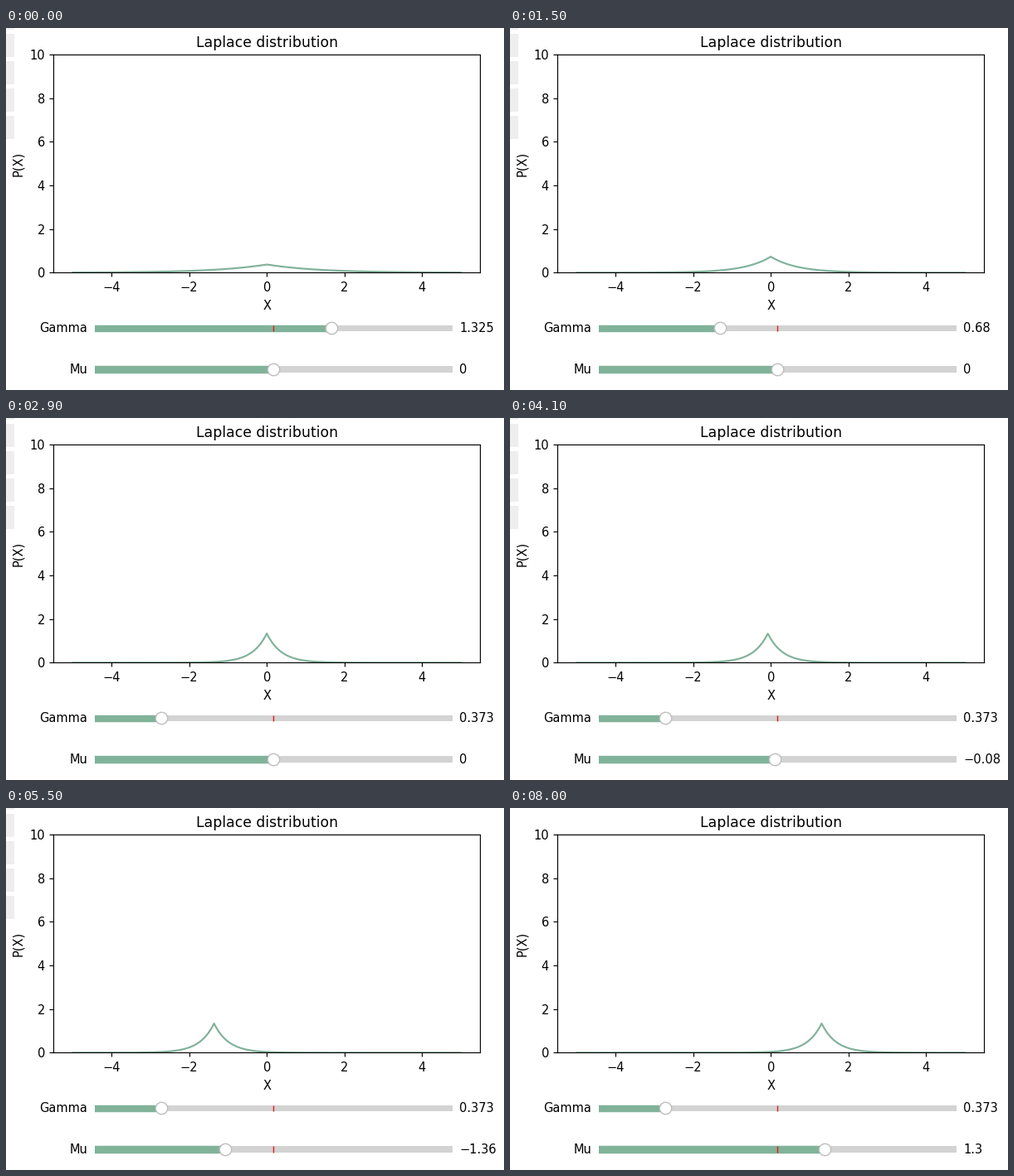
Animation of 600 by 437 pixels, one loop 9400 ms. Source, as a matplotlib script:

```python
import numpy as np
import matplotlib.pyplot as plt
from matplotlib.animation import FuncAnimation
from matplotlib.patches import Rectangle

W, H, DPI = 600, 437, 103.8
FRAMES, STEP = 94, 100
GREEN = "#81B29A"
TURN = -1.753  # leftmost mu, where the drag reverses

# ticks at which the dragged knob rests for one step
STALLS = {4, 44, 48, *range(6, 25, 6), *range(46, 63, 4)}

plt.rcParams.update({"font.family": "DejaVu Sans", "font.size": 10.2,
                     "axes.titlesize": 12})


def drag(tick, t0, t1, a, b, power):
    """Ease from a at t0 to b at t1; t0 > t1 eases backwards in time."""
    u = np.clip((tick - t0) / (t1 - t0), 0, 1)
    return float(a + (b - a) * u ** power)


def gamma_at(tick):
    return drag(tick, 29, 0, 0.373, 1.325, 1.554)


def mu_at(tick):
    if tick < 54:
        return drag(tick, 40, 51, 0, TURN, 1.309)
    return drag(tick, 54, 68, TURN, 1.31, 0.777)


def laplace(x, mu, gamma):
    return np.exp(-np.abs(x - mu) / gamma) / (2 * gamma)


def format_value(v, digits):
    """Drop decimals as long as the rounding error stays small."""
    limit = 10.0 ** -digits
    while digits >= 0 and abs(v - round(v, digits)) < limit:
        digits -= 1
    text = f"{v:.{digits + 1}f}"
    return "0" if text == "-0" else text.replace("-", "\u2212")


def add_axes(left, top, width, height):
    """Axes placed by pixels from the top left corner."""
    return fig.add_axes([left / W, 1 - (top + height) / H,
                         width / W, height / H])


class ValueBar:
    def __init__(self, label, mid, low, high, start, digits):
        self.low, self.digits = low, digits
        ax = add_axes(107, mid - 7.5, 430.7, 15)
        ax.set(xlim=(low, high), ylim=(0, 1))
        ax.set_axis_off()
        ax.add_patch(Rectangle((low, 0.25), high - low, 0.5,
                               fc="lightgrey", ec="none"))
        self.fill = ax.add_patch(Rectangle((low, 0.25), 0, 0.5, color=GREEN))
        ax.axvline(start, 0.25, 0.75, color="#e0201c", lw=1,
                   solid_capstyle="butt")
        self.knob, = ax.plot([start], [0.5], "o", ms=10, mfc="white",
                             mec="0.75", mew=1, clip_on=False)
        ax.text(-0.02, 0.5, label, transform=ax.transAxes,
                ha="right", va="center")
        self.text = ax.text(1.02, 0.5, "", transform=ax.transAxes,
                            ha="left", va="center")

    def set(self, v):
        self.fill.set_width(v - self.low)
        self.knob.set_xdata([v])
        self.text.set_text(format_value(v, self.digits))


# the tiny surplus keeps the pixel size from being truncated
fig = plt.figure(figsize=((W + 1e-6) / DPI, (H + 1e-6) / DPI), dpi=DPI,
                 facecolor="white")

tabs = [fig.add_artist(Rectangle((0, 1 - (top + 28) / H), 10 / W, 28 / H,
                                 transform=fig.transFigure, fc="#eeeeee",
                                 ec="none", zorder=-1))
        for top in range(-26, 107, 33)]

ax = add_axes(57, 32, 514.4, 263.4)
ax.set(xlim=(-5.5, 5.5), ylim=(0, 10), xticks=range(-4, 5, 2),
       yticks=range(0, 11, 2))
ax.tick_params(axis="x", pad=4)
ax.set_xlabel("X", labelpad=5)
ax.set_ylabel("P(X)", labelpad=4.5)
ax.set_title("Laplace distribution")
xs = np.linspace(-5, 5, 1001)
curve, = ax.plot(xs, 0 * xs, color=GREEN, lw=1.5)

gamma_bar = ValueBar("Gamma", 362.3, 0, 2, 1, 3)
mu_bar = ValueBar("Mu", 412.2, -5, 5, 0, 2)


def update(i):
    tick = i - 1 if i in STALLS else i
    gamma, mu = gamma_at(tick), mu_at(tick)
    curve.set_ydata(laplace(xs, mu, gamma))
    gamma_bar.set(gamma)
    mu_bar.set(mu)
    # the tabs fade out near the end
    for tab in tabs:
        tab.set_alpha(np.clip((80 - i) / 2, 0, 1))
    return []


anim = FuncAnimation(fig, update, frames=FRAMES, interval=STEP,
                     init_func=lambda: update(0), repeat=True)
plt.show()
```
